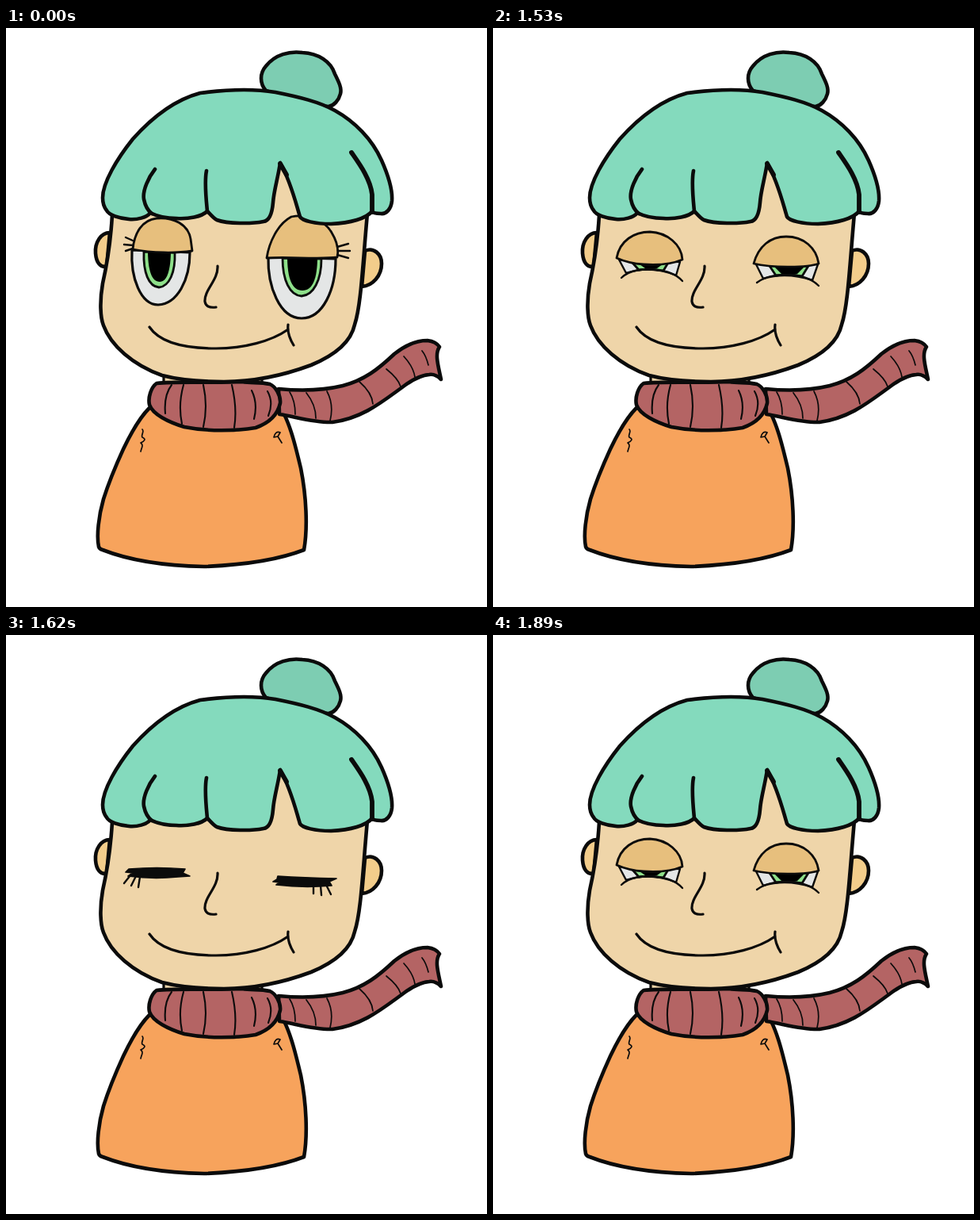
Recreate the animation shown at these times as an HTML page. Size 607 by 730 pixels, loop 1.98 s.

```html
<!DOCTYPE html>
<html lang="en">
<head>
<meta charset="utf-8">
<title>Blinking portrait</title>
<style>
  html, body { margin: 0; width: 100%; height: 100%; overflow: hidden; background: #fff; }
  svg { display: block; width: 100vw; height: 100vh; }
  path { fill: none; stroke: #0b0b0b; stroke-width: 4.6; stroke-linecap: round; stroke-linejoin: round; }
  .bold { stroke-width: 5.8; }
  .mid { stroke-width: 3.2; }
  .line { stroke-width: 2.4; }
  .thin { stroke-width: 1.7; }
  .hair { fill: #84dabd; }
  .bun { fill: #7dcdb2; }
  .skin { fill: #efd5a9; }
  .ear { fill: #f3cd8b; }
  .lid { fill: #e7bf7d; stroke-width: 2.8; }
  .scarf { fill: #b46464; }
  .shirt { fill: #f7a35c; }
  .white { fill: #e4e6e6; }
  .iris { fill: #8ee08a; stroke-width: 2.8; }
  .pupil { fill: #000; stroke: none; }
  .pose { display: none; }
</style>
</head>
<body>
<svg viewBox="0 0 607 730">
  <!-- body and neck -->
  <path class="shirt" d="M181 479C170 490 158 510 148 531C137 555 129 575 123 594C117 615 114 640 117 654Q118 657 122 658C155 671 200 678 250 679C300 677 345 670 376 658C381 630 379 590 372 555C366 530 360 505 351 487L320 470H200Z"/>
  <path class="thin" d="M172 506C175 509 170 513 172 516C177 518 175 521 170 523C174 526 171 529 170 534M348 523L343 515L346 510C342 508 339 511 338 516L343 515"/>
  <path class="skin mid" d="M199 438V449H323V438"/>

  <!-- scarf -->
  <path class="scarf" d="M344 455C375 458 400 457 425 451C452 444 470 430 490 411C505 399 520 394 532 394C540 395 545 399 547 402C541 411 545 424 549 443C545 439 540 436 534 437C522 438 512 444 500 453C475 471 450 492 412 497C390 498 365 490 345 487Z"/>
  <path class="thin" d="M358 459Q365 470 365 487M379 460Q391 475 391 492M405 458Q414 475 409 495M446 446Q462 460 463 474M480 430Q495 442 498 452M502 414Q514 427 516 440M525 407Q530 413 533 425"/>
  <path class="scarf" d="M190 448C183 453 179 466 181 475C185 487 205 497 225 503C255 509 290 508 315 504C332 498 343 487 346 473C347 463 340 452 333 449C320 446 310 448 298 446C260 448 220 445 190 448Z"/>
  <path class="thin" style="stroke-width:2.1" d="M209 450Q199 463 201 486M224 450Q217 475 222 499M249 450Q255 477 249 503M285 450Q292 480 288 504M310 457Q318 473 313 493M330 458Q338 472 331 489"/>

  <!-- ears and face -->
  <path class="ear" d="M131 258C120 258 112 270 113 284C114 296 119 302 127 301Z"/>
  <path class="ear" d="M453 281C464 276 474 285 474 297C474 312 463 325 449 326Z"/>
  <path class="skin" d="M134 236C132 270 127 300 122 322C118 345 119 365 123 375C132 400 160 425 197 438C220 444 250 446 275 446C310 446 350 438 385 425C414 413 435 397 440 374C448 350 450 300 456 234L346 160Z"/>
  <path class="mid" d="M267 300C268 318 250 330 251 345C252 351 257 353 265 352"/>
  <path class="mid" d="M181 377C195 398 230 404 265 404C300 404 335 395 356 380M356 374C355 382 358 392 363 400"/>

  <!-- eyes -->
  <g class="pose" id="open">
    <path class="white mid" d="M159 280C157 315 170 349 192 349C216 348 232 318 232 283Z"/>
    <path class="iris" d="M174 282C173 308 180 326 193 327C206 326 214 308 213 283Z"/>
    <path class="pupil" d="M179 280C179 306 184 320 194 320C203 320 208 306 208 280Z"/>
    <path class="lid" d="M160 279C162 258 172 242 190 240C212 238 230 248 233 266L235 281C215 284 185 284 160 279Z"/>
    <path class="line" d="M151 264L160 268M149 273L160 274M151 281L160 278"/>
    <path class="white mid" d="M331 289C330 325 345 366 373 366C400 366 416 330 416 291Z"/>
    <path class="iris" d="M349 290C349 318 358 337 373 338C388 337 398 318 398 291Z"/>
    <path class="pupil" d="M355 288C355 316 361 331 374 331C387 331 393 316 393 288Z"/>
    <path class="lid" d="M329 290C332 270 343 247 360 238C380 234 402 242 411 258C417 268 420 280 418 289C395 292 355 288 329 290Z"/>
    <path class="line" d="M418 276L432 272M419 281L434 281M418 286L432 290"/>
  </g>

  <g class="pose" id="half">
    <path class="white line" d="M159 292L168 309Q200 299 231 312L236 295Z"/>
    <path class="iris thin" d="M176 296L184 305Q200 303 215 306L221 296Z"/>
    <path class="pupil" d="M181 295L192 303Q200 304 207 303L218 295Z"/>
    <path class="lid" d="M156 290C160 268 178 257 198 257C220 258 238 273 239 292C225 298 205 299 190 298C175 297 165 294 156 290Z"/>
    <path class="line" d="M162 315C172 305 190 303 205 305C220 306 232 311 239 319"/>
    <path class="white line" d="M332 298L341 316Q370 307 403 318L410 298Z"/>
    <path class="iris thin" d="M349 300L357 312Q373 310 390 313L398 300Z"/>
    <path class="pupil" d="M354 300L364 310Q375 311 384 310L394 300Z"/>
    <path class="lid" d="M329 297C335 275 350 263 370 263C392 263 408 277 411 297C395 303 350 302 329 297Z"/>
    <path class="line" d="M333 321C345 312 360 311 375 311C390 312 402 316 411 325"/>
  </g>

  <g class="pose" id="closed">
    <path class="thin" style="fill:#0b0b0b" d="M155 295Q190 292 226 295L223 300L232 304L217 305Q185 308 154 304L160 300L151 299Z"/>
    <path class="line" d="M157 303L149 313M164 304L158 316M169 305L167 318"/>
    <path class="thin" style="fill:#0b0b0b" d="M343 304Q375 306 417 307L408 311L411 316Q375 319 341 315L345 312L337 311L342 308Z"/>
    <path class="line" d="M388 317L388 326M397 316L398 328M404 315L410 327"/>
  </g>

  <!-- hair -->
  <path class="bun" d="M328 79C320 70 320 57 328 48C340 33 358 29 374 31C394 32 410 42 415 58C420 68 424 76 422 83C420 91 414 98 407 99L380 97Z"/>
  <path class="hair" d="M122 214C122 195 140 165 160 140C185 112 215 90 245 82C275 78 310 76 340 81C370 87 395 93 415 104C440 118 462 140 474 167C482 185 488 205 487 218C486 228 480 235 473 234C467 234 463 233 462 231C455 240 435 246 410 247C390 247 374 243 371 238C366 222 360 195 346 170C343 190 338 205 337 220C336 232 333 243 325 244C310 247 280 247 266 242C262 240 260 237 254 231C247 238 230 241 215 240C200 240 188 236 182 233C178 239 165 242 155 241C143 240 130 236 127 230C123 225 122 220 122 214Z"/>
  <path d="M188 178C180 188 172 205 174 216C176 226 180 231 184 234M253 180C250 195 253 220 254 231"/>
  <path class="bold" d="M436 157C445 170 460 190 462 210V232M346 171L354 185"/>
</svg>
<script>
  const LOOP = 1980;
  const steps = [[0, "open"], [1530, "half"], [1620, "closed"], [1890, "half"]];
  const poses = [...document.querySelectorAll(".pose")];
  const start = performance.now();

  function draw(now) {
    const t = Math.max(0, now - start) % LOOP;
    const [, name] = steps.findLast(([from]) => t >= from);
    for (const pose of poses) pose.style.display = pose.id === name ? "inline" : "none";
    requestAnimationFrame(draw);
  }
  draw(start);
</script>
</body>
</html>
```
